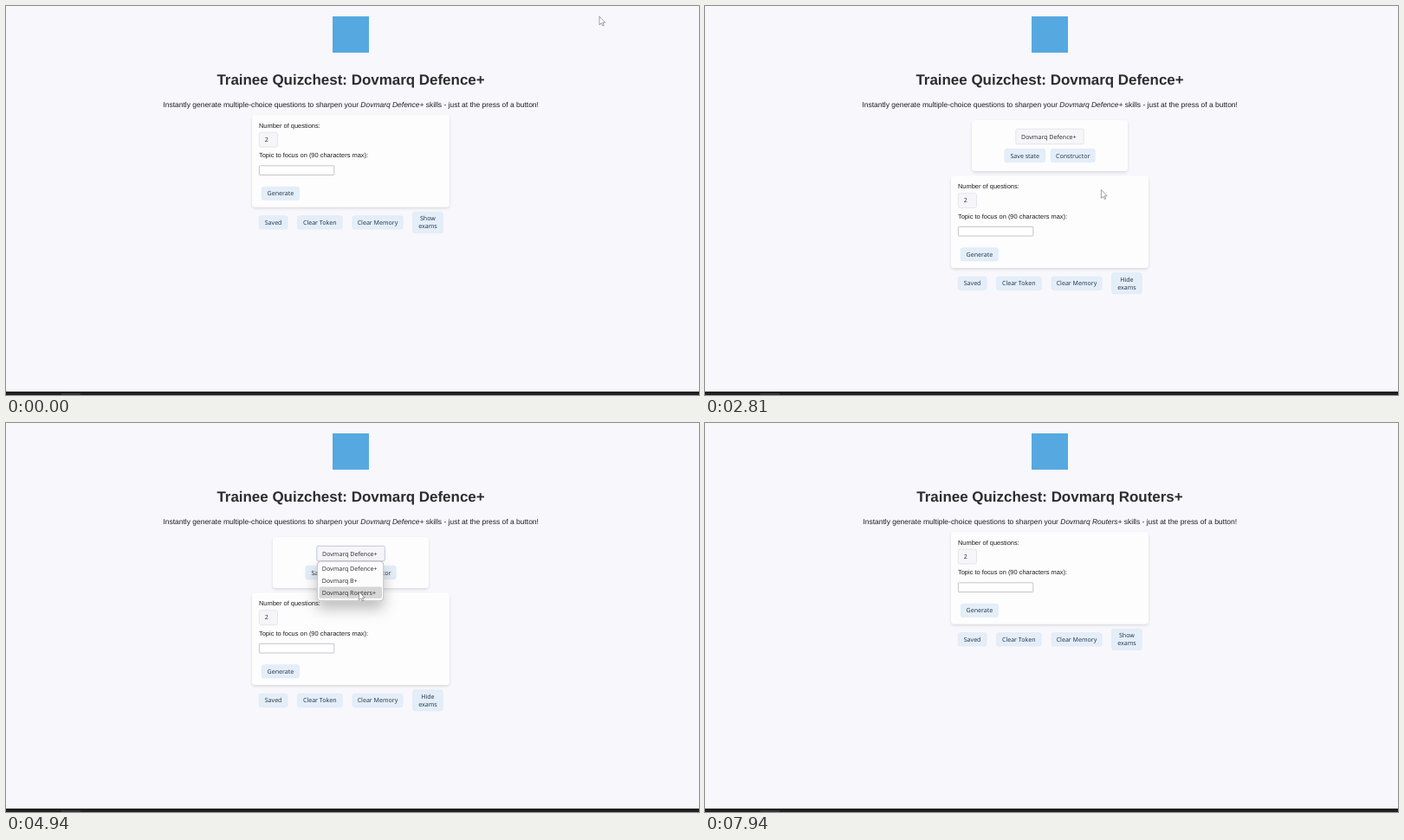
Write an HTML page that moves like this. It is 800 px wide and 450 px high and loops after 8000 ms.

```html
<!DOCTYPE html>
<html lang="en">
<head>
<meta charset="utf-8">
<title>Practice question generator</title>
<style>
  html, body { margin: 0; width: 100%; height: 100%; overflow: hidden; background: #f8f7fc; }
  svg { display: block; width: 100vw; height: 100vh; }
  text { font-family: "Liberation Sans", Arial, sans-serif; font-size: 7.45px; fill: #1d1d1f; text-rendering: geometricPrecision; }
  .title { font-size: 16.94px; font-weight: bold; fill: #2d2d30; }
  .lead { font-size: 8.465px; }
  .ui { font-family: "Noto Sans", sans-serif; font-size: 7.06px; fill: #2b3a4c; }
  .field { fill: #333; }
  .mid { text-anchor: middle; }
  .card { fill: #fdfdfe; filter: url(#soft); }
  .button rect { fill: #e3eef9; stroke: #d9e8f5; stroke-width: .6; }
  .button.hover rect { fill: #cfe2f4; stroke: #b4d0ea; }
  .box { fill: #f6f6fa; stroke: #dddde4; stroke-width: .7; }
  .box.focus { stroke: #a9b4c8; }
  .cursor path { fill: #fff; stroke: #77777c; stroke-width: .7; stroke-linejoin: round; }
</style>
</head>
<body>
<svg id="stage" viewBox="0 0 800 450" preserveAspectRatio="none">
  <defs>
    <filter id="soft" x="-10%" y="-20%" width="120%" height="150%">
      <feDropShadow dx="0" dy="1.6" stdDeviation="1.7" flood-color="#000" flood-opacity=".13"/>
    </filter>
    <filter id="deep" x="-40%" y="-40%" width="180%" height="220%">
      <feDropShadow dx="0" dy="9" stdDeviation="8" flood-color="#000" flood-opacity=".25"/>
    </filter>
  </defs>
  <rect width="800" height="450" fill="#f8f7fc"/>
  <rect y="446" width="800" height="4" fill="#202022"/>
  <rect x="64" y="448" width="22" height="2" fill="#353537"/>
  <rect x="377" y="12" width="42" height="42" fill="#55a9e0"/>
  <text class="title mid" id="title" x="398" y="91"/>
  <text class="lead mid" x="398.2" y="116.5">Instantly generate multiple-choice questions to sharpen your <tspan id="leadName" font-style="italic"></tspan> skills - just at the press of a button!</text>
  <g id="exams">
    <rect class="card" x="308" y="132" width="180" height="59" rx="4"/>
    <rect class="box" id="select" x="358.8" y="142.3" width="78.5" height="17.4" rx="2"/>
    <text class="ui field" id="selected" x="365" y="153.6"/>
  </g>
  <g id="form">
    <rect class="card" x="284" y="126" width="228" height="106.5" rx="4"/>
    <text x="292" y="140.9">Number of questions:</text>
    <rect class="box" x="292.3" y="146.2" width="21.2" height="16.8" rx="2"/>
    <text class="ui field" x="298.7" y="156.9">2</text>
    <text x="292" y="175.3">Topic to focus on (90 characters max):</text>
    <rect x="292.4" y="184.8" width="86.4" height="10.7" rx=".8" fill="#fff" stroke="#adadb2" stroke-width=".7"/>
  </g>
  <g id="menu">
    <rect x="359.3" y="160" width="76.5" height="45.8" rx="4" fill="#fcfcfc" stroke="#a5a5aa" stroke-width=".7" filter="url(#deep)"/>
    <rect id="pick" x="361.6" width="72.4" height="13.4" rx="1.5" fill="#d6d6d7"/>
  </g>
  <g class="cursor" id="cursor">
    <path id="arrow" d="M0 0V9.8L2.3 7.7L3.9 11L5.3 10.4L3.8 7.2H6.7Z"/>
    <path id="hand" d="M-1 .8Q0-.6 1 .8V4.6Q2-.2+2.6 4.6Q3.6 3.4 4.2 5Q5.6 4.3 5.7 6V8.2Q5.6 10 4.6 11.6H-.6Q-1.2 9.6-3.1 7.2Q-3.2 5.6-1 7.2Z"/>
  </g>
</svg>
<script>
const LOOP = 8000;
const BRAND = "Dovmarq";
const EXAMS = ["Defence+", "B+", "Routers+"].map(name => `${BRAND} ${name}`);
const OPENED = 1700, UNHOVER = 2560, MENU_ON = 3360, CHOSEN = 5260, SWITCHED = 6480, COLLAPSED = 7400;
const SHIFT = 70.5;

// Pointer stops: time, x, y
const STOPS = [
  [0, 685, 12], [60, 685, 12], [790, 398, 176], [900, 398, 176],
  [1500, 485, 245], [2500, 485, 245], [3250, 411, 158], [4130, 411, 158],
  [4860, 407.5, 195], [5260, 407.5, 195], [5840, 379.8, 174],
  [6880, 379.8, 174], [7300, 486, 318], [7480, 486, 318], [7900, 447, 160]
];
const HAND_TIMES = [[740, 960], [1420, OPENED], [5720, 6960], [7220, COLLAPSED]];

const $ = id => document.getElementById(id);
const within = (t, from, to) => t >= from && t < to;
const show = (node, on) => node.setAttribute("display", on ? "inline" : "none");

function add(parent, tag, attrs, content = "") {
  const node = document.createElementNS("http://www.w3.org/2000/svg", tag);
  for (const key in attrs) node.setAttribute(key, attrs[key]);
  node.textContent = content;
  return parent.appendChild(node);
}

function button(parent, x, y, width, height, ...lines) {
  const group = add(parent, "g", { class: "button" });
  add(group, "rect", { x, y, width, height, rx: 2.5 });
  const labels = lines.map((line, i) => add(group, "text", {
    class: "ui mid", x: x + width / 2, y: y + height / 2 + 2.5 + (i - (lines.length - 1) / 2) * 8.8
  }, line));
  return { group, labels };
}

const hover = (item, on) => item.group.classList.toggle("hover", on);

const form = $("form"), exams = $("exams");
button(form, 295.2, 209.2, 43.4, 15.2, "Generate");
button(form, 292.2, 242.7, 32.8, 15.4, "Saved");
button(form, 336.4, 242.7, 51.8, 15.4, "Clear Token");
button(form, 400, 242.7, 58, 15.4, "Clear Memory");
const toggle = button(form, 469.6, 238.2, 34.6, 24.2, "Show", "exams");

const saveRow = add(exams, "g", {}), switchRow = add(exams, "g", {});
button(saveRow, 345.8, 165.3, 47, 15.4, "Save state");
button(saveRow, 399.2, 165.3, 51, 15.4, "Constructor");
const switcher = button(switchRow, 341.9, 165.3, 55, 15.4, "Switch exam");
button(switchRow, 402.8, 165.3, 51, 15.4, "Constructor");

EXAMS.forEach((name, i) => add($("menu"), "text", { class: "ui field", x: 364.8, y: 171.4 + i * 13.7 }, name));

function pointerAt(t) {
  const next = STOPS.findIndex(stop => stop[0] > t);
  if (next < 0) return STOPS.at(-1).slice(1);
  const [t0, x0, y0] = STOPS[next - 1], [t1, x1, y1] = STOPS[next];
  const p = (t - t0) / (t1 - t0), k = p * p * (3 - 2 * p);
  return [x0 + (x1 - x0) * k, y0 + (y1 - y0) * k];
}

function render(t) {
  const open = within(t, OPENED, COLLAPSED);
  const exam = EXAMS[t < SWITCHED ? 0 : 2];
  const [x, y] = pointerAt(t);

  $("title").textContent = `Trainee Quizchest: ${exam}`;
  $("leadName").textContent = exam;

  show(exams, open);
  form.setAttribute("transform", `translate(0 ${open ? SHIFT : 0})`);
  toggle.labels[0].textContent = open ? "Hide" : "Show";
  hover(toggle, within(t, 1420, UNHOVER) || within(t, 7220, 7520));

  const pending = within(t, CHOSEN, SWITCHED);
  $("selected").textContent = EXAMS[t < CHOSEN ? 0 : 2];
  $("select").classList.toggle("focus", within(t, MENU_ON, SWITCHED));
  show(saveRow, !pending);
  show(switchRow, pending);
  hover(switcher, t >= 5720);

  show($("menu"), within(t, MENU_ON, CHOSEN));
  const row = Math.max(0, Math.min(2, Math.floor((y - 162) / 13.7)));
  $("pick").setAttribute("y", 162 + row * 13.7);

  const pointing = HAND_TIMES.some(([from, to]) => within(t, from, to));
  show($("hand"), pointing);
  show($("arrow"), !pointing);
  show($("cursor"), t < 7900);
  $("cursor").setAttribute("transform", `translate(${x} ${y})`);
}

const start = performance.now();
function tick() {
  render((performance.now() - start) % LOOP);
  requestAnimationFrame(tick);
}
tick();
</script>
</body>
</html>
```
